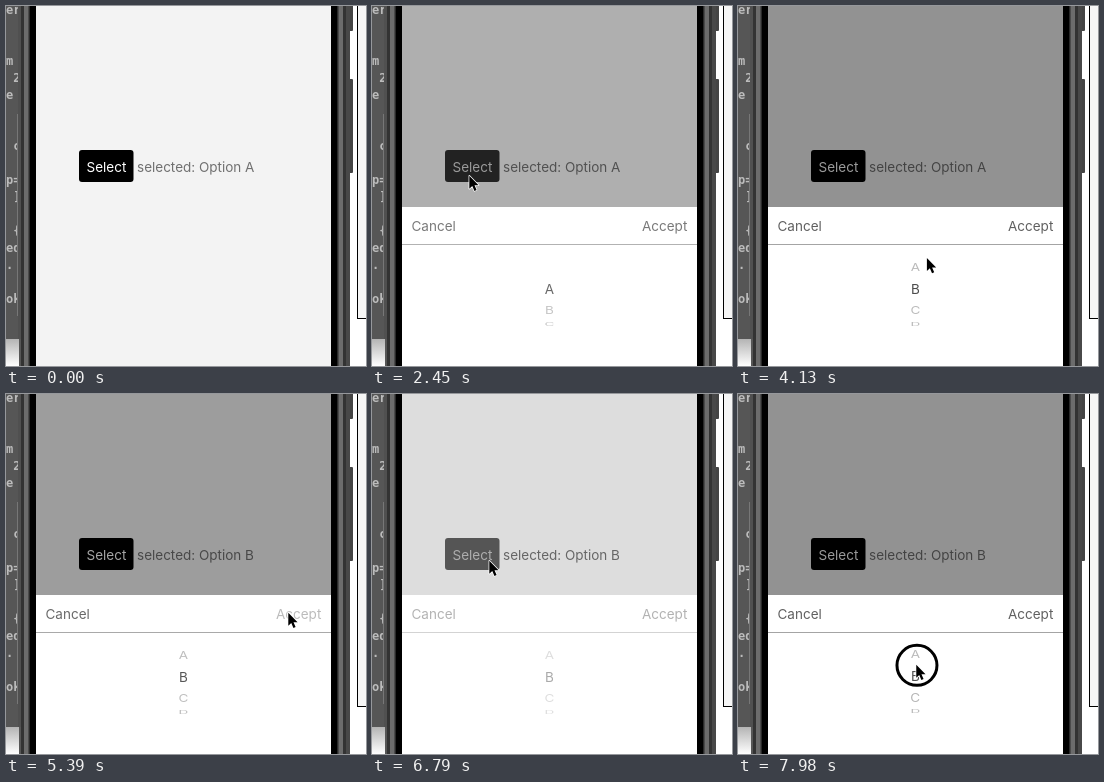
Write an HTML page that moves like this. It is 360 px wide and 360 px high and loops after 8 s.

```html
<!DOCTYPE html>
<html lang="en">
<head>
<meta charset="utf-8">
<title>Option picker</title>
<style>
  html, body { margin: 0; width: 100%; height: 100%; overflow: hidden; background: #fff; }
  svg { display: block; width: 100vw; height: 100vh; }
  text { font: 13.5px Inter, "Open Sans", sans-serif; fill: #707070; }
  #code text { font: bold 12px "DejaVu Sans Mono", monospace; fill: #bcbcbc; white-space: pre; }
  #sheet text { fill: #606060; }
  #wheel text { text-anchor: middle; fill: #3a3a3a; }
  #select text { fill: #fff; }
</style>
</head>
<body>
<svg viewBox="0 0 360 360">
  <defs>
    <linearGradient id="dock" x2="0" y2="1">
      <stop offset="0" stop-color="#b4b4b4"/><stop offset="1" stop-color="#fff"/>
    </linearGradient>
    <g id="edge">
      <rect x="15" width="4" height="360" fill="#333"/>
      <rect x="18" width="5" height="360" fill="#6c6c6c"/>
      <rect x="22.5" width="1.5" height="360" fill="#2a2a2a"/>
    </g>
  </defs>

  <rect width="16" height="360" fill="#565656"/>
  <rect y="333" width="13" height="27" fill="url(#dock)"/>
  <g id="code"></g>
  <rect x="11" y="108" width="1" height="202" fill="#777"/>
  <rect x="12" width="4" height="333" fill="#505050"/>
  <rect x="351.5" y="-2" width="12" height="314.5" fill="#f6f6f6" stroke="#000"/>

  <rect x="343" y="-4" width="4" height="29" rx="1" fill="#444"/>
  <rect x="343" y="73" width="4" height="94" rx="1" fill="#444"/>
  <rect x="339" width="5" height="360" fill="#484848"/>
  <rect x="22" width="311" height="360"/>
  <use href="#edge"/>
  <use href="#edge" transform="translate(355 0) scale(-1 1)"/>

  <rect x="30" width="295" height="360" fill="#f3f3f3"/>
  <g id="select">
    <rect x="73" y="144" width="54.5" height="32" rx="3"/>
    <text x="80.5" y="165.5">Select</text>
  </g>
  <text id="label" x="131" y="165.5"></text>

  <rect id="shade" x="30" width="295" height="201"/>
  <g id="sheet">
    <rect id="paper" x="30" y="201" width="295" height="159" fill="#fff"/>
    <g id="controls">
      <rect x="30" y="238" width="295" height="1" fill="#a4a4a4"/>
      <text x="39.5" y="225">Cancel</text>
      <text id="accept" x="270" y="225">Accept</text>
      <g id="wheel"></g>
    </g>
  </g>

  <g id="pointer">
    <g id="ring" fill="none">
      <circle cx="1" cy="1.3" r="20" stroke="#fff" stroke-width="6.4"/>
      <circle cx="1" cy="1.3" r="20" stroke="#000" stroke-width="3"/>
    </g>
    <path transform="translate(.3 .8) scale(.9)" d="M0 0V14.4L3.3 11.4L5.7 16.8L8.1 15.7L5.8 10.5H10.3Z"
      stroke="#fff" stroke-width="1.6" paint-order="stroke" stroke-linejoin="round"/>
  </g>
</svg>
<script>
const LOOP = 8000, STEP = 70;
const $ = id => document.getElementById(id);

function addText(parent, str, x, y) {
  const el = document.createElementNS("http://www.w3.org/2000/svg", "text");
  el.textContent = str;
  el.setAttribute("x", x);
  el.setAttribute("y", y);
  return parent.appendChild(el);
}

"er|||m| 2|e||| c||p=| ]|| {|ed|.||ok".split("|")
  .forEach((line, i) => addText($("code"), line, 0, 8 + 17 * i));
const letters = [..."ABCD"].map(s => addText($("wheel"), s, 0, 4.8));

// Eased 0 to 1, beginning at start
function ramp(t, start, duration) {
  const k = Math.min(1, Math.max(0, (t - start) / duration));
  return k * k * (3 - 2 * k);
}
const pulse = (t, on, off) => ramp(t, on, 140) - ramp(t, off, 140);

// Start time and destination; longer moves take longer
const entry = { x: 5, y: 93 };
const moves = [
  [70, 126, 165], [480, 97, 169], [2590, 171, 288], [3180, 178, 300], [3500, 178, 255],
  [4060, 282, 218], [5390, 121, 177], [5880, 117, 166], [7000, 167, 286], [7840, 178, 270]
].map(([start, x, y]) => ({ start, x, y }));

function pointerAt(t) {
  let { x, y } = entry, from = entry;
  for (const to of moves) {
    const k = ramp(t, to.start, 100 + 2.3 * Math.hypot(to.x - from.x, to.y - from.y));
    x += (to.x - x) * k;
    y += (to.y - y) * k;
    from = to;
  }
  return [x, y];
}

const held = (t, starts, duration) => starts.some(s => t >= s && t < s + duration);
const ringShown = t => held(t, [770, 1680, 4830], 280) || held(t, [3290, 7630], 700);

function drawWheel(turn) {
  letters.forEach((el, i) => {
    const offset = i - turn, angle = offset * .62, squash = Math.cos(angle);
    el.setAttribute("transform",
      `translate(177.3 ${283 + 37 * Math.sin(angle)}) scale(1 ${Math.max(squash, .01)})`);
    el.style.opacity = squash > .1 ? Math.max(.35, .9 - .55 * Math.abs(offset)) : 0;
  });
}

function draw(t) {
  const modal = ramp(t, 2315, 210) - ramp(t, 5340, 240) + ramp(t, 6725, 210);
  const press = pulse(t, 1680, 2380) + pulse(t, 6110, 6790);
  const grey = 93 * press;
  const [x, y] = pointerAt(t);

  $("select").firstElementChild.style.fill = `rgb(${grey},${grey},${grey})`;
  $("select").lastElementChild.style.opacity = 1 - .4 * press;
  $("label").textContent = "selected: Option " + (t < 5320 ? "A" : "B");

  $("shade").style.opacity = .4 * modal;
  $("paper").style.opacity = Math.min(1, modal * 4.6);
  $("controls").style.opacity = Math.sqrt(modal);
  $("accept").style.opacity = 1 - .55 * pulse(t, 4830, 5600);
  drawWheel(ramp(t, 3500, 630) + .05 * ramp(t, 7840, 140));

  $("pointer").setAttribute("transform", `translate(${x} ${y})`);
  $("pointer").style.visibility = t < 70 ? "hidden" : "visible";
  $("ring").style.opacity = ringShown(t) ? 1 : 0;
}

const start = performance.now();
function tick() {
  const t = (performance.now() - start) % LOOP;
  draw(Math.floor(t / STEP) * STEP);
  requestAnimationFrame(tick);
}
tick();
</script>
</body>
</html>
```
